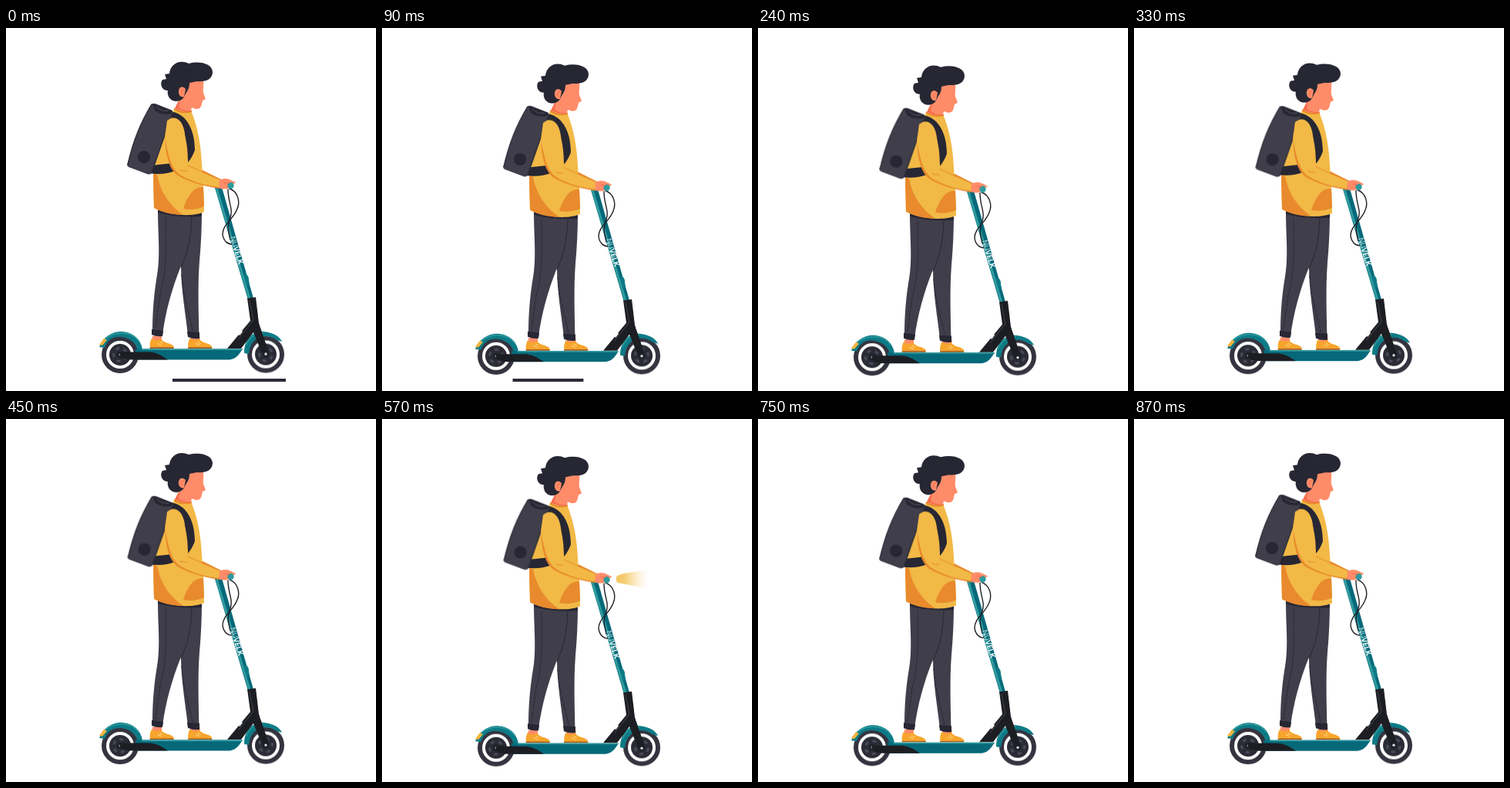
An HTML page that plays this animation: 480 px wide and 470 px high, repeating every 900 ms.

```html
<!DOCTYPE html>
<html lang="en">
<head>
<meta charset="utf-8">
<title>Scooter rider</title>
<style>
  html, body { margin: 0; width: 100%; height: 100%; overflow: hidden; background: #fff; }
  svg { display: block; width: 480px; height: 470px; }
  .bob, .wheels { animation: bob 900ms ease-in-out infinite; }
  .bob { --drop: 5.4px; }
  .wheels { --drop: 3.6px; }
  .bag { animation: lag 900ms ease-in-out infinite; }
  .spin { animation: spin 900ms linear infinite; }
  .beam { animation: blink 900ms step-end infinite; }
  .ground { animation: ground 900ms infinite; }
  @keyframes bob {
    0%, 47.8%, 100% { transform: translateY(0); }
    20%, 71.1% { transform: translateY(var(--drop)); }
  }
  @keyframes lag { 50% { transform: translate(.6px, 1.7px); } }
  @keyframes spin { to { transform: rotate(360deg); } }
  @keyframes blink {
    0%, 76.66% { opacity: 0; }
    56.66% { opacity: 1; }
  }
  @keyframes ground {
    0% { stroke-dasharray: 0 0 147 999; visibility: visible; animation-timing-function: steps(8); }
    26.66%, 100% { stroke-dasharray: 0 271 0 999; visibility: hidden; }
  }
  .line { fill: none; stroke-linecap: round; stroke-linejoin: round; }
  .teal { fill: #0c7b86; }
  .deep { fill: #05697a; }
  .aqua { stroke: #2f9b9f; }
  .ink { fill: #272734; }
  .cloth { fill: #3f3e4a; }
  .skin { fill: #ff8c69; }
  .gold { fill: #f2b946; }
  .rust { fill: #e88a2d; }
  .shoe { fill: #f7a52c; }
  .brand { font: 300 10px Roboto, Arial, sans-serif; fill: #fff; }
  .brand tspan { font-weight: 500; }
</style>
</head>
<body>
<svg viewBox="0 0 480 470">
  <defs>
    <linearGradient id="glow">
      <stop offset="0" stop-color="#f3c660"/>
      <stop offset=".3" stop-color="#f5cf78"/>
      <stop offset="1" stop-color="#fbe6b8" stop-opacity="0"/>
    </linearGradient>
    <g id="wheel">
      <circle r="24" fill="#343440"/>
      <circle r="16" fill="#2b2b36" stroke="#fff" stroke-width="4"/>
      <g class="spin">
        <circle r="8.5" fill="none" stroke="#4a4c59" stroke-width="3" stroke-dasharray="5 5.68"/>
        <circle r="4" fill="#1d1d26"/>
        <circle r="1.6" fill="#8a8d98"/>
      </g>
    </g>
    <g id="shoe">
      <path class="skin" d="M3 -16H15V-9H3Z"/>
      <path class="shoe" d="M0 0C-1 -5 0 -9 2 -13C6 -9 10 -10 14 -12C18 -7 23 -7 27 -5C30 -4 31 -2 31 0Z"/>
      <path class="line" stroke="#8f5420" stroke-width="1.4" d="M0 -.2H30"/>
      <path class="line" stroke="#ffe0a0" stroke-width="1" d="M13 -8L16 -6M10 -6L14 -4"/>
    </g>
  </defs>

  <path class="line ground" stroke="#2b2b38" stroke-width="4" style="stroke-linecap:butt" d="M363 456H92"/>

  <g class="wheels">
    <use href="#wheel" x="148" y="423"/>
    <use href="#wheel" x="337" y="422.5"/>
  </g>

  <g class="bob">
    <path class="beam" fill="url(#glow)" d="M304 200Q307 197 313 196L344 191V215L312 209Q305 208 304 206Z"/>

    <!-- scooter -->
    <path class="teal" d="M121 413C126 400 137 393 150 393C166 394 175 404 177 416H188V429H172C174 415 166 402 150 400C138 399 132 404 128 414Z"/>
    <path class="line aqua" stroke-width="1.5" d="M128 403C141 391 164 393 172 405"/>
    <path fill="#f4b23c" d="M121 410L127 402L131 404L125 411Z"/>
    <path class="deep" d="M168 415.500H307L304 420C299 427 295 429.500 287 429.500H168Z"/>
    <path class="line aqua" stroke-width="1.5" d="M176 416.300H306"/>
    <path fill="#1d1e23" d="M148 420Q152 418.500 160 419.500H185C196 420 202 424 210 429.500H162Q150 429 148 424Z"/>

    <path class="teal" d="M309 421C309 402 320 393 333 393C346 394 355 399 358 406L351 404C344 399 337 398 330 400C321 403 316 411 315 422Z"/>
    <path class="line aqua" stroke-width="1.3" d="M312 410C316 399 324 395 334 395"/>
    <path class="deep" d="M271 207L280 206L321 350L314 352Z"/>
    <path class="line aqua" stroke-width="3" d="M273.500 209L316 351"/>
    <path class="teal" d="M309 318Q315 319 315 326L316 333L312 334Z"/>
    <path fill="#1d1e23" d="M313 350L324 348.500L328 382L341 420Q337 426 332 421L321 394L305 415H287L317 379Z"/>
    <path class="line" stroke="#3b3c43" stroke-width="1.2" d="M316 353L321 378L302 402"/>
    <path class="line" stroke="#fff" stroke-width="1.7" d="M328 374L330 381M330 384L331 388M303 397L306 393"/>
    <circle cx="337" cy="422" r="1.700" fill="#d8d9dd"/>
    <text class="brand" transform="translate(290.500 271) rotate(73)">NU<tspan>VELK</tspan></text>
    <g class="line" stroke="#202027" stroke-width="1.4">
      <path d="M290 208C301 212 304 225 300 234C295 248 281 254 281 267C282 276 288 280 293 280"/>
      <path d="M288 209C288 228 296 234 290 248C287 255 288 262 291 274"/>
    </g>

    <!-- legs -->
    <use href="#shoe" x="187" y="414.5"/>
    <use href="#shoe" x="236.500" y="414.5"/>
    <path class="cloth" d="M197 234C197 270 201 296 195 326C191 352 190 374 190 394L203 397C207 367 215 338 227 308C227 338 233 370 236 398L250.500 400C250 370 248.500 334 251 302C253 280 254 258 254 236Z"/>
    <path class="ink" d="M197 235L254 240V244Q220 246 197 239ZM189 390L204 392L203 399Q195 400 189 397ZM235 393L251 394V402Q242 403 236 400Z"/>
    <g class="line" stroke="#272734" stroke-width="1">
      <path d="M241 244C240 275 235 292 227 310"/>
      <path stroke-dasharray="3 2" d="M207 246C208 290 208 314 200 345L194 388M228 320C230 350 238 370 242 392"/>
    </g>

    <!-- torso -->
    <path class="rust" d="M249 181L281 197L278 204L248 194Z"/>
    <path class="gold" d="M254 188L279 199L274 204L250 194Z"/>
    <path class="gold" d="M219 104C226 108 234 109 240 107C246 121 251 140 253 162C255 190 257 214 257 238C244 245 211 243 192 233L191 198C194 165 201 132 219 104Z"/>
    <path class="rust" d="M191 188L196 190C200 212 212 230 230 242C215 242 201 238 192 233ZM230 234C233 224 239 213 245 209Q249 206 256 206L257 231Q244 237 230 234Z"/>
    <path class="line" stroke="#e88a2d" stroke-width="2.500" d="M219 105Q228 111 240 108"/>

    <!-- head -->
    <path fill="#f66b4b" d="M226 90L240 100V108Q229 109 219 104Z"/>
    <path class="skin" d="M234 69L256 68C257 74 255 79 256 84L259 92L255 94L254 98C253 104 250 107 241 103L240 107Q231 108 224 103L226 88Z"/>
    <path class="ink" d="M212 59C213 47 225 40 237 46C252 42 268 47 268 57C268 67 258 70 248 69L238 71C238 79 235 81 232 87C229 96 216 98 211 89Q209 85 210 81C202 81 199 72 203 67L208 66L206 60Z"/>
    <path class="skin" d="M233 79C228 73 223 78 224 84C225 89 229 90 231 89Z"/>
    <path class="line" stroke="#f66b4b" stroke-width="1" d="M231 80Q227 79 228 85"/>

    <!-- bag -->
    <path class="ink" d="M212 108C232 109 245 129 245 158Q242 167 236 174C236 147 231 119 211 115Z"/>
    <path class="ink" d="M188 178L216 175L219 185Q204 191 186 188Z"/>
    <g class="bag">
      <path class="cloth" d="M188 99Q190 97 194 98L214 106Q217 107 216 111L190 186Q188 191 183 189L159 180Q156 178 158 174C164 149 176 120 188 99Z"/>
      <path class="ink" d="M190 98L216 107L214 111Q202 113 193 107Z"/>
      <path class="line" stroke="#55545f" stroke-width="1" d="M195 102Q202 109 211 107"/>
      <path class="line" stroke="#2d2d39" stroke-width="1.3" d="M189 99C175 121 164 149 158 177M216 110L189 187"/>
      <circle class="ink" cx="179" cy="167" r="8"/>
    </g>

    <!-- arm -->
    <path class="rust" d="M207 133C205 160 211 183 223 191C238 200 258 205 277 208V203L235 187Z"/>
    <path class="gold" d="M209 120C220 111 230 120 232 137C234 154 234 169 238 180L278 197L277 206C257 204 239 198 226 190C212 181 210 158 206 142Z"/>
    <path class="line" stroke="#e88a2d" stroke-width="1" d="M236 178L256 187M226 184Q231 186 235 185"/>
    <path class="skin" d="M277 197C283 194 288 195 292 197L298 200Q297 203 293 201L290 207Q283 210 276 207Z"/>
    <circle cx="291.500" cy="204" r="4.200" fill="#2c9a9e"/>
    <path class="line" stroke="#f66b4b" stroke-width="1" d="M284 200L290 201"/>
  </g>
</svg>
</body>
</html>
```
